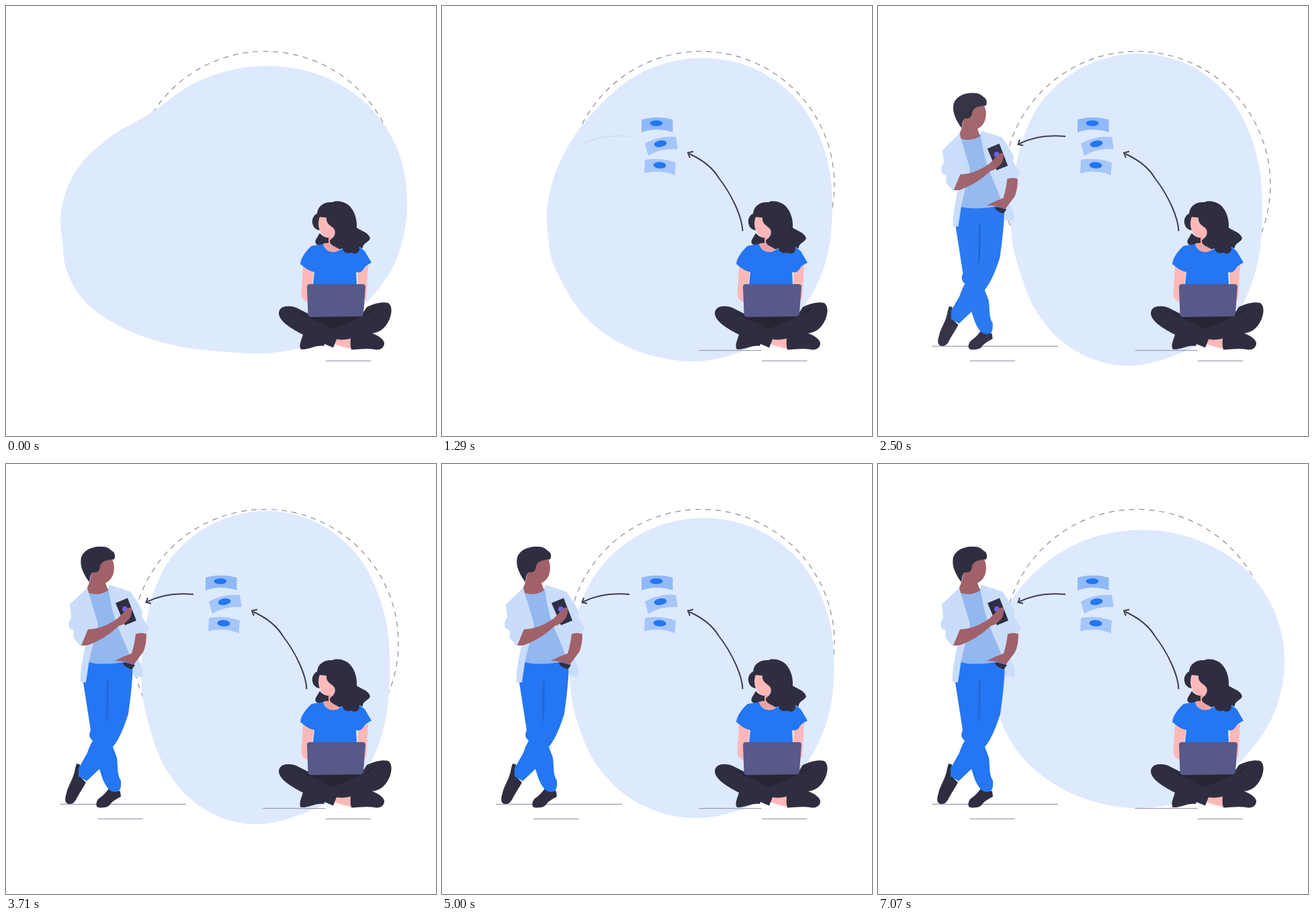
An HTML page with a canvas for the animation above (7210 ms loop, 640 by 640 pixels).

```html
<!DOCTYPE html>
<html lang="en">
<head>
<meta charset="utf-8">
<title>Sending money</title>
<style>
html, body { margin: 0; width: 100%; height: 100%; overflow: hidden; background: #fff; }
canvas { display: block; width: 100vw; height: 100vh; }
</style>
</head>
<body>
<canvas id="stage" width="640" height="640"></canvas>
<script>
const ctx = document.getElementById('stage').getContext('2d');
const LOOP = 7210, STEP = 71.42, LAST_STEP = 99;
const INK = '#3f3d56', DARK = '#2f2e41', BLUE = '#2476f2', PALE = '#dde9fd';
const ROSE = '#ffb8b8', BROWN = '#a0616a', COAT = '#c9ddfb';

// Blob outlines, clockwise from the top, as x, y pairs.
const WIDE = [386,89, 470,104, 540,149, 584,217, 597,300, 577,386, 528,450, 450,505, 386,517, 330,515,
  250,505, 172,478, 115,437, 89,390, 84,350, 81,318, 105,244, 155,195, 211,162, 290,110];
const TALL = [386,70, 460,86, 523,136, 560,212, 571,312, 560,400, 530,465, 440,521, 375,536, 335,531,
  280,503, 237,452, 212,385, 206,362, 203,340, 201,312, 206,255, 217,201, 238,151, 304,91];
const ROUND = [390,98, 470,111, 545,155, 591,222, 605,302, 588,374, 547,435, 460,500, 390,512, 340,507,
  270,481, 218,440, 186,390, 178,365, 173,340, 171,312, 174,270, 188,222, 220,175, 300,117];

const part = (color, d) => ({ color, path: new Path2D(d) });

const woman = [
  part(ROSE, 'M442 387L458 395L456 414L449 416V441Q440 437 439.500 430Z'),
  part(ROSE, 'M524 396L539 386L536 436L532 437L523 414Z'),
  part(ROSE, 'M491 494L513 493L514 510Q505 509 489 503Z'),
  part(DARK, 'M406 457C407 446 421 445 432 449L452 459H530L537 448C548 443 560 440 569 442C576 447 574 460 570 468C564 480 556 486 545 487C556 491 564 498 563 503C562 510 555 513 548 511C538 509 525 511 514 511.500Q512 505 513 495Q501 498 492 496L487 508.500L474 503L473 506C461 504 450 512 439 511C435 506 440 496 442 489C428 482 406 470 406 457Z'),
  part('#262533', 'M432 453L452 462H530L551 448Q547 457 528 462C514 471 498 476 486 480.500Q478 479 470 472Q448 465 432 453Z'),
  part(ROSE, 'M465 312H485L491 330Q490 346 480 346C470 343 464 333 465 312Z'),
  part('#eba3a5', 'M480 343L496 350V364C487 369 475 366 472 354L480 352Z'),
  part(BLUE, 'M455 357L472 354C475 368 491 369 498 362L528 360L534 365L544 382Q535 386 531 393Q527 398 521 396L522 414H457L459 396C451 395 443 388 438 384C439 374 447 364 455 357Z'),
  part(DARK, 'M463 309C464 297 474 291 486 292C492 289 502 291 508 295C517 301 523 315 522 330C529 335 540 337 542 346C540 352 530 353 531 361L526 359C527 366 521 371 514 367C508 369 502 367 501 361L496 362C491 358 481 356 482 349C486 345 492 341 489 333C486 327 476 326 477 315L467 314C464 321 465 328 467 334C459 333 455 326 456 318Q458 311 463 309Z'),
  part(DARK, 'M467 338Q473 345 480 345V353C474 352 471 356 464 355.500Q459 354 461 348Z'),
  part('#575988', 'M452 414H531Q535 414 535 418L532 458Q531 462 527 462L454 463Q450 463 449.500 459L448 418Q448 414 452 414Z')
];

const man = [
  part(DARK, 'M105 446L110 447L109 464L119 474C114 483 110 489 106 496Q102 506 95 506C87 506 87 499 90 490C92 479 101 468 103 453Z'),
  part(DARK, 'M153 483L170 487L171 495C162 500 158 502 154 508Q150 512 139 511.500C132 511 134 502 138 498Q147 492 153 483Z'),
  part('#93b8ee', 'M122 189L140 193L154 184L163 225L186 282L189 298H122L132 250Z'),
  part(BLUE, 'M122 295Q145 301 187 293L189 300Q188 330 182 372Q171 407 159 421L165 437C167 451 165 463 171 471Q172 482 168 487Q157 490 152 483C145 475 142 463 139 454L120 472L108 465V453L121 430Q125 418 129 412Q121 405 126 396L115 325Z'),
  part('#1e67d8', 'M150 323L153 322L152 371L149 390Z'),
  part(BROWN, 'M128 158L141 144L158 142C164 153 161 172 148 177L152 188Q139 197 123 192L120 186Q126 175 127 160Z'),
  part(DARK, 'M124 176C116 165 110 153 111.500 142C113 130 126 122 143 123Q151 123 156 128Q165 133 161 142C151 143 143 143 140 152Q139 163 130 161Q126 160 124 176Z'),
  part(COAT, 'M121 184L123 192C128 208 133 224 137 239L124 291L119 325H111Q109 312 118 271L110 270L100 258L101 248L94 244L93 236L97 228L95 209Z'),
  part(COAT, 'M152 183L155 180L185 190Q195 203 203 219L202 227L213 244L207 253L193 258L190 275L203 304V317L190 316L187 298L183 282L163 234L157 211Z'),
  part(BROWN, 'M193 253Q201 250 209 253Q209 270 204 280Q195 292 190 299Q179 293 162 293Q175 286 187 282Q191 270 193 253Z'),
  part(DARK, 'M174 295L192 299L188 305Q184 306 175 299Z'),
  part(DARK, 'M163 207L181 199.500L194 233L177 240Z'),
  part('#6c63ff', 'M173 216a4 4 0 1 0 8 0a4 4 0 1 0 -8 0'),
  part(BROWN, 'M112 270L122 246Q143 246 166 230L176 220Q182 212 187 214Q188 225 183 231Q176 239 168 241Q145 262 121 270Z')
];

const bills = [
  { at: 950, x: 319, y: 174.5, ry: 4.2, turn: 0, ...part('#90b9f8', 'M297 169Q320 162.500 343.500 169V188Q320 180 297 188Z') },
  { at: 800, x: 325, y: 205, ry: 4.9, turn: -0.17, ...part('#a5c6fa', 'M302 204.500Q325 192.500 348 195L351 213Q326 211 307 223Z') },
  { at: 650, x: 324, y: 237, ry: 4.8, turn: 0.07, ...part('#a5c6fa', 'M302 229Q326 225 348 233L346.500 252Q325 243 301 249Z') }
];
const stroke = (at, d) => ({ at, path: new Path2D(d) });
const arrows = [
  stroke(300, 'M447.500 335C447 316 433 283 412 256Q399 234 368 220'),
  stroke(400, 'M374 216.500L366 218.500L369 226'),
  stroke(1260, 'M279 194Q239 190 209 205.500'),
  stroke(1360, 'M211 199L208.500 206L216 207.500')
];

const clamp = v => Math.max(0, Math.min(1, v));
const ramp = (t, start, length) => clamp((t - start) / length);
const mix = (a, b, p) => a.map((v, i) => v + (b[i] - v) * p);

function drawParts(parts) {
  for (const { color, path } of parts) {
    ctx.fillStyle = color;
    ctx.fill(path);
  }
}

function withAlpha(alpha, draw) {
  if (alpha <= 0) return;
  ctx.save();
  ctx.globalAlpha = alpha;
  draw();
  ctx.restore();
}

function blobAt(t) {
  if (t < 3000) return mix(WIDE, TALL, Math.sin(t / 3000 * Math.PI / 2));
  return mix(TALL, ROUND, (1 - Math.cos(Math.PI * ramp(t, 3500, 3600))) / 2);
}

// Smooth closed curve; handles follow the length of each segment.
function drawBlob(coords) {
  const n = coords.length / 2;
  const point = i => {
    const k = (i + n) % n * 2;
    return { x: coords[k], y: coords[k + 1] };
  };
  const distance = (a, b) => Math.hypot(b.x - a.x, b.y - a.y);
  const handle = (i, reach) => {
    const before = point(i - 1), here = point(i), after = point(i + 1);
    const back = distance(before, here), ahead = distance(here, after);
    const slope = axis => ((here[axis] - before[axis]) / back * ahead + (after[axis] - here[axis]) / ahead * back) / (back + ahead);
    return [here.x + slope('x') * reach, here.y + slope('y') * reach];
  };
  ctx.beginPath();
  ctx.moveTo(coords[0], coords[1]);
  for (let i = 0; i < n; i++) {
    const end = point(i + 1), reach = distance(point(i), end) / 3;
    ctx.bezierCurveTo(...handle(i, reach), ...handle(i + 1, -reach), end.x, end.y);
  }
  ctx.fillStyle = PALE;
  ctx.fill();
}

function drawDashes(t) {
  ctx.save();
  ctx.strokeStyle = '#8d8ba0';
  ctx.lineWidth = 1.2;
  ctx.setLineDash([8, 7.03]);
  ctx.lineDashOffset = -t * 0.02;
  ctx.beginPath();
  ctx.arc(385.5, 266, 198.5, 0, Math.PI * 2);
  ctx.stroke();
  ctx.restore();
}

function floorLine(x1, x2, y, alpha) {
  withAlpha(alpha, () => {
    ctx.fillStyle = '#9d99b4';
    ctx.fillRect(x1, y, x2 - x1, 1.2);
  });
}

function drawBill(bill) {
  drawParts([bill]);
  ctx.fillStyle = BLUE;
  ctx.beginPath();
  ctx.ellipse(bill.x, bill.y, 9.5, bill.ry, bill.turn, 0, Math.PI * 2);
  ctx.fill();
}

function drawArrow(arrow) {
  ctx.strokeStyle = INK;
  ctx.lineWidth = 2;
  ctx.stroke(arrow.path);
}

function drawMan(p) {
  withAlpha(p, () => {
    const scale = 0.5 + p / 2;
    ctx.translate(150, 511);
    ctx.scale(scale, scale);
    ctx.translate(-150, -511);
    drawParts(man);
  });
}

function render(t) {
  ctx.fillStyle = '#fff';
  ctx.fillRect(0, 0, 640, 640);
  drawDashes(t);
  drawBlob(blobAt(t));
  const manFloor = ramp(t, 1580, 400);
  floorLine(476, 543.5, 527.6, 1);
  floorLine(382.5, 475.5, 512, ramp(t, 300, 400));
  floorLine(80, 268, 505.8, manFloor);
  floorLine(136.5, 204, 527.6, manFloor);
  for (const bill of bills) withAlpha(ramp(t, bill.at, 300), () => drawBill(bill));
  for (const arrow of arrows) withAlpha(ramp(t, arrow.at, 380), () => drawArrow(arrow));
  drawMan(ramp(t, 1640, 890));
  drawParts(woman);
}

const begin = performance.now();
function tick() {
  const t = (performance.now() - begin) % LOOP;
  render(Math.min(LAST_STEP, Math.floor((t + 2) / STEP)) * STEP);
  requestAnimationFrame(tick);
}
tick();
</script>
</body>
</html>
```
